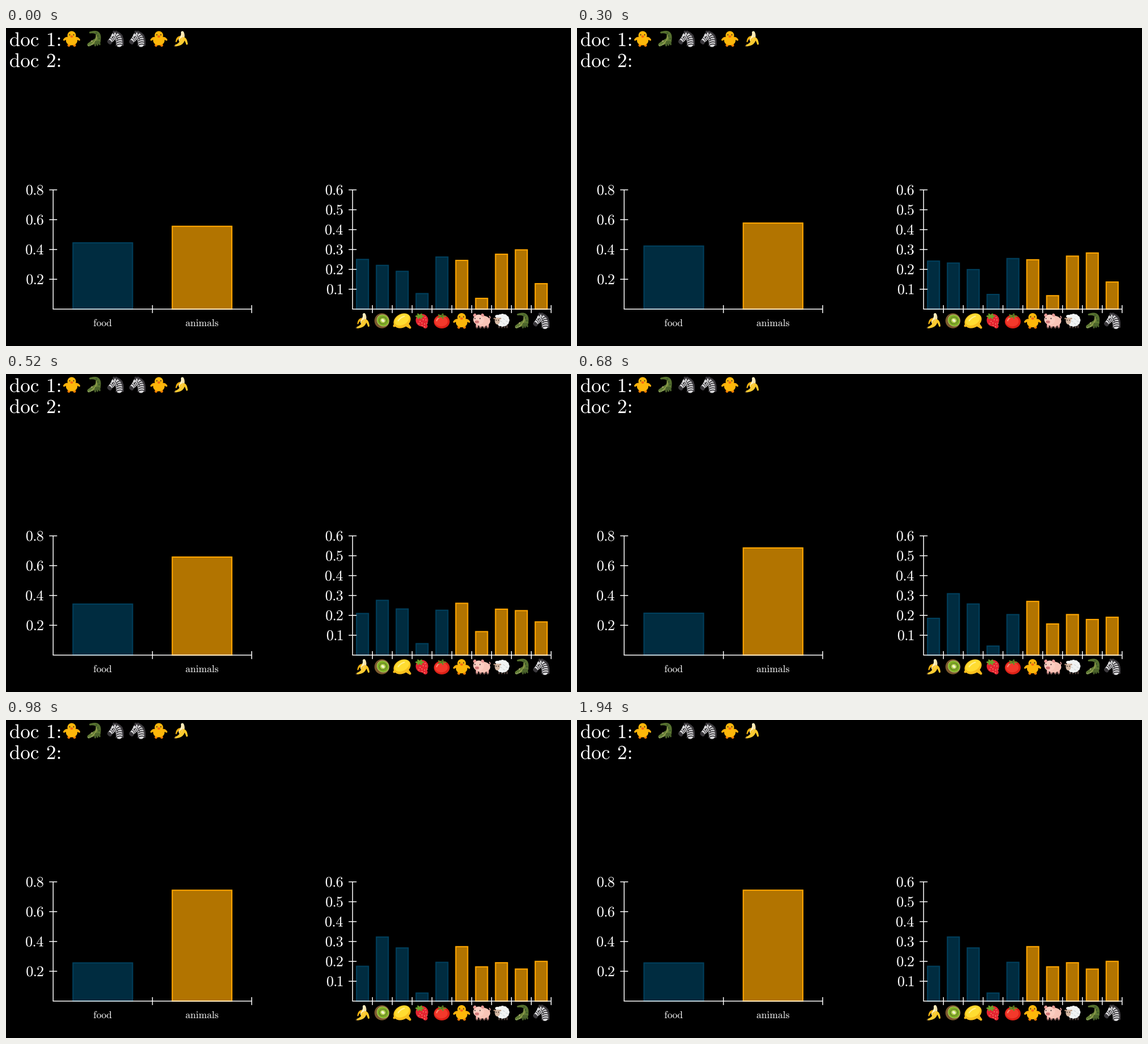
These frames come from a looping animation (998 px wide and 561 px high, 2000 ms). A matplotlib script:

```python
import numpy as np
import matplotlib.pyplot as plt
from matplotlib.animation import FuncAnimation
from matplotlib.patches import Ellipse, PathPatch, Polygon, Rectangle
from matplotlib.path import Path
from matplotlib.textpath import TextPath
from matplotlib.transforms import Affine2D

W, H, DPI = 998, 561, 64
FRAMES, STEP = 100, 20
UNIT = 70.125
BASE, AXIS_H, AXIS_W = 495.9, 3 * UNIT, 5 * UNIT
BIG, MEDIUM, SMALL = UNIT / 2, UNIT * 3 / 8, UNIT / 4
BLUE, ORANGE = ("#002c40", "#003f5c"), ("#b27400", "#ffa600")

plt.rcParams["mathtext.fontset"] = "cm"
plt.rcParams["path.snap"] = False

fig = plt.figure(figsize=(W / DPI, H / DPI), dpi=DPI, facecolor="black")
ax = fig.add_axes([0, 0, 1, 1])
ax.set_xlim(0, W)
ax.set_ylim(H, 0)
ax.axis("off")


def px(w):
    return w * 72 / DPI


def text(s, x, base, em, align=0.5):
    """Roman text on a baseline; align 0..1 picks the ink point put at x."""
    path = TextPath((0, 0), rf"$\mathrm{{{s}}}$", size=em)
    box = path.get_extents()
    shift = x - box.x0 - align * box.width
    path = path.transformed(Affine2D().scale(1, -1).translate(shift, base))
    ax.add_patch(PathPatch(path, fc="white", lw=0, zorder=4))
    return box.width


def number(value, right, mid):
    """Digits set one by one with an even gap between their ink."""
    for c in f"{value:.1f}"[::-1]:
        right -= text(c, right, mid + MEDIUM / 3, MEDIUM, 1) + 0.036 * UNIT


def rule(xs, ys):
    ax.plot(xs, ys, color="white", lw=px(1.5), solid_capstyle="butt", zorder=3)


class Pen:
    """Draws small shapes around a centre, in pixels."""

    def __init__(self, x, y):
        self.o = np.array([x, y])

    def oval(self, color, x, y, w, h=None, turn=0):
        ax.add_patch(Ellipse(self.o + (x, y), w, h or w, angle=turn,
                             fc=color, lw=0, zorder=5))

    def line(self, color, w, *pts):
        kind = Path.LINETO if len(pts) == 2 else Path.CURVE3
        path = Path(np.array(pts) + self.o, [Path.MOVETO] + [kind] * (len(pts) - 1))
        ax.add_patch(PathPatch(path, fc="none", ec=color, lw=px(w),
                               capstyle="round", zorder=5))

    def limb(self, color, w0, w1, a, b, c):
        """Round-ended curve whose width runs from w0 to w1."""
        a, b, c = map(np.array, (a, b, c))
        t = np.linspace(0, 1, 14)[:, None]
        mid = (1 - t) ** 2 * a + 2 * t * (1 - t) * b + t ** 2 * c
        d = np.gradient(mid, axis=0)
        side = d[:, ::-1] * (-1, 1) / np.hypot(*d.T)[:, None] * (w0 + (w1 - w0) * t) / 2
        edge = np.vstack([mid + side, (mid - side)[::-1]])
        ax.add_patch(Polygon(edge + self.o, fc=color, lw=0, zorder=5))
        self.oval(color, *a, w0)
        self.oval(color, *c, w1)


def ring(n):
    return np.arange(n) * 2 * np.pi / n


def chick(p):
    for s in (-1, 1):
        p.limb("#f57c00", 2, 5, (4 * s, 8), (4 * s, 10), (5 * s, 11.5))
        p.limb("#fbb00c", 8, 3, (5 * s, 1), (10 * s, -2), (13.5 * s, 2))
    p.oval("#fdb70a", 0, 3.5, 20, 16)
    p.oval("#fdb70a", 0, -6, 15, 15)
    for s in (-1, 1):
        p.oval("#4a3324", 3.5 * s, -7, 2, 2.4)
    p.oval("#f36c12", 0, -4, 5, 4)


def croc(p):
    p.limb("#56702f", 3, 11, (-6, -11), (13, -15), (7, 3))
    p.limb("#617b35", 11, 6, (7, 4), (2, 4), (-8, 10.5))
    p.line("#8f9b4b", 2, (5, -6), (8, 0), (-2, 9))
    for k in range(3):
        p.line("#4a622b", 3, (4 + 3 * k, 5), (3 + 4 * k, 12 - k))
        p.oval("#3f5a2a", 5 + 2.5 * k, -10 + 5 * k, 3)
        p.oval("#f0ecc8", -9 + 3 * k, 12 - k, 1.2)
    p.oval("#fff3a0", -3, 4, 2.4)
    p.oval("#222222", -3, 4, 1.2)


def zebra(p):
    dark, pale = "#3b393d", "#dcdcde"
    p.line(dark, 4, (-1, -12), (15, -10), (13, 11))
    p.limb(pale, 11, 12, (7, 9), (7, -4), (-1, -5))
    p.limb(pale, 11, 7, (-1, -5), (-5, 0), (-10, 5))
    p.limb(dark, 6, 6, (-11, 5), (-10, 6), (-9, 7))
    for k in range(5):
        p.line(dark, 1.7, (12, 10 - 4 * k), (7, 8 - 4 * k), (1 + k / 2, 12 - 4 * k))
    for k in range(4):
        p.line(dark, 1.3, (-9 + 3 * k, -1 - 2 * k), (-5 + 2 * k, 0 - k), (-5 + 3 * k, 4 - k))
    for x in (-3, 2):
        p.oval(dark, x, -11, 3, 7)
    p.oval("#111111", -4.5, -3, 2)


def banana(p):
    p.limb("#f0b010", 6, 2, (0, -2), (-6, -3), (-8, 5))
    p.limb("#fff0bd", 5, 9, (3, -11), (5, -6), (1, 2))
    p.limb("#fdcb32", 9, 3, (2, 3), (2, 9), (-9, 12))
    p.limb("#ffc928", 6, 3, (4, 0), (9, -1), (11, 9))
    p.line("#e7d08b", 1, (5, -9), (5, -3), (2, 2))
    p.oval("#6b5034", -10.5, 12.5, 2.5)


def kiwi(p):
    p.oval("#7d592e", -0.5, 0, 26.5)
    for color, size in (("#c8dc83", 22), ("#7fae22", 20.5), ("#a8cb42", 13)):
        p.oval(color, 1.2, -0.5, size, size * 0.92, 35)
    for a in ring(14):
        p.oval("#25301a", 1.2 + 6 * np.cos(a), 5.5 * np.sin(a) - 0.5, 1.5)
    p.oval("#f4f3c9", 1.2, -0.5, 6.5, 5, 35)


def lemon(p):
    p.limb("#f6b91a", 12, 4, (0, 0), (8, 6), (14, 12))
    p.limb("#f6b91a", 12, 4, (0, 0), (-9, 4), (-14, 9))
    p.oval("#f9c01d", 0, 0, 32, 24, -30)
    p.oval("#ffdc31", 0, -2, 28, 18, -30)
    p.line("#fff08a", 2.2, (-7, 0), (-3, -6), (4, -8))


def strawberry(p):
    p.limb("#e52531", 22, 8, (0, -1), (2, 3), (6, 9.5))
    for k in range(1, 12):
        a, r = 2.4 * k, 2.7 * np.sqrt(k)
        p.oval("#ffb98a", 2 + r * np.cos(a), 2 + r * np.sin(a), 1.3, 1.8)
    for a in ring(6):
        p.line("#6aa32b", 3, (-4, -8), (-4 + 6 * np.cos(a), -8 + 4 * np.sin(a)))


def tomato(p):
    p.oval("#dc2117", 0, 1.5, 28, 24)
    p.oval("#f3392b", -1, 1, 23, 18)
    p.line("#ff8a78", 2, (-9, 0), (-8, -4), (-5, -5))
    for a in ring(5):
        p.line("#5c9227", 2.2, (0, -8), (7 * np.cos(a), -8 + 4 * np.sin(a)))
    p.line("#42701f", 2, (0, -8), (1, -12))


def pig(p):
    for x in (-8, -2, 5, 11):
        p.line("#e8a49e", 4, (x, 5), (x, 11))
        p.line("#75534f", 3, (x, 12), (x, 12.3))
    p.line("#f2a9a5", 1.6, (13, -2), (17, -6), (14, -8))
    p.oval("#f8c4b7", 2, 0.5, 27, 19)
    p.oval("#fbcdc1", -5, -2, 19, 18)
    for s in (-1, 1):
        p.oval("#e99a96", -5 + 7 * s, -10, 5, 6, -35 * s)
        p.oval("#33272a", -7 + 4.5 * s, -4, 2)
    p.oval("#ec908f", -8, 2, 8, 6)
    for x in (-9.5, -6.5):
        p.oval("#8a4547", x, 2, 1.5, 2.4)


def sheep(p):
    for x in (-4, 1, 6, 10):
        p.line("#5d4b45", 2.2, (x, 7), (x, 12))
    for color, size in (("#c9d0d4", 9), ("#f1f3f3", 8)):
        for a in ring(12):
            p.oval(color, 2 + 8 * np.cos(a), 7 * np.sin(a) - 1, size)
    p.oval("#f1f3f3", 2, -1, 18, 16)
    for a in ring(4):
        p.line("#cbd3d7", 1, (3 + 5 * np.cos(a), 4 * np.sin(a)),
               (6 + 5 * np.cos(a), 2 + 4 * np.sin(a)))
    p.oval("#d7b9a4", -7, 0, 9, 13)
    p.oval("#f4f5f5", -7, -8, 8, 5)
    for s in (-1, 1):
        p.oval("#b8967f", -7 + 5 * s, -4, 4, 2.5)
        p.oval("#2d2624", -7 + 2 * s, -1, 1.6, 2)


def chart(x0, top, tick, starts, ends, colors):
    """Axes, ticks and bars; returns (bar, start, end) with heights in pixels."""
    scale, step = AXIS_H / top, AXIS_W / len(starts)
    rule([x0 - 0.7, x0 + AXIS_W], [BASE] * 2)
    rule([x0] * 2, [BASE, BASE - AXIS_H])
    for k in range(1, round(top / tick) + 1):
        y = BASE - k * tick * scale
        rule([x0 - 7, x0 + 7], [y, y])
        number(k * tick, x0 - UNIT / 4, y)
    for k in range(1, len(starts) + 1):
        rule([x0 + k * step] * 2, [BASE - 7, BASE + 7])
    bars = []
    for k, (a, b, (fill, edge)) in enumerate(zip(starts, ends, colors)):
        bar = Rectangle((x0 + (k + 0.2) * step, BASE), 0.6 * step, 0, fc=fill,
                        ec=edge, lw=px(2.1), joinstyle="miter", zorder=2)
        ax.add_patch(bar)
        bars.append((bar, a * scale, b * scale))
    return bars


def smooth(t):
    """Sigmoid easing, rescaled to run exactly from 0 to 1."""
    edge = 1 / (1 + np.exp(5))
    s = 1 / (1 + np.exp(-10 * (np.clip(t, 0, 1) - 0.5)))
    return (s - edge) / (1 - 2 * edge)


for n, base in ((1, 32), (2, 69)):
    text("doc", 7, base, BIG, 0)
    text(n, 79.8, base, BIG)
    text(":", 95.5, base, BIG, 1)

bars = chart(83.3, 0.8, 0.2, [4 / 9, 5 / 9], [0.256, 0.744], [BLUE, ORANGE])
bars += chart(612.2, 0.6, 0.1,
              [.25, .22, .19, .078, .262, .245, .054, .276, .298, .128],
              [.175, .3225, .2675, .0405, .195, .274, .1725, .193, .161, .2],
              [BLUE] * 5 + [ORANGE] * 5)
text("food", 170.7, 526, SMALL)
text("animals", 346.2, 526, SMALL)

foods = [banana, kiwi, lemon, strawberry, tomato]
animals = [chick, pig, sheep, croc, zebra]
for k, draw in enumerate([chick, croc, zebra, zebra, chick, banana]):
    draw(Pen(116 + 38.5 * k, 19))
for k, draw in enumerate(foods + animals):
    draw(Pen(629.5 + 35.06 * k, 516.5))


def update(i):
    s = smooth(round(i * STEP * 0.06) / 60)  # poses advance at 60 per second
    for bar, a, b in bars:
        h = a + (b - a) * s
        bar.set_y(BASE - h)
        bar.set_height(h)
    return [bar for bar, _, _ in bars]


anim = FuncAnimation(fig, update, frames=FRAMES, interval=STEP, repeat=True,
                     repeat_delay=0, blit=False)
plt.show()
```
